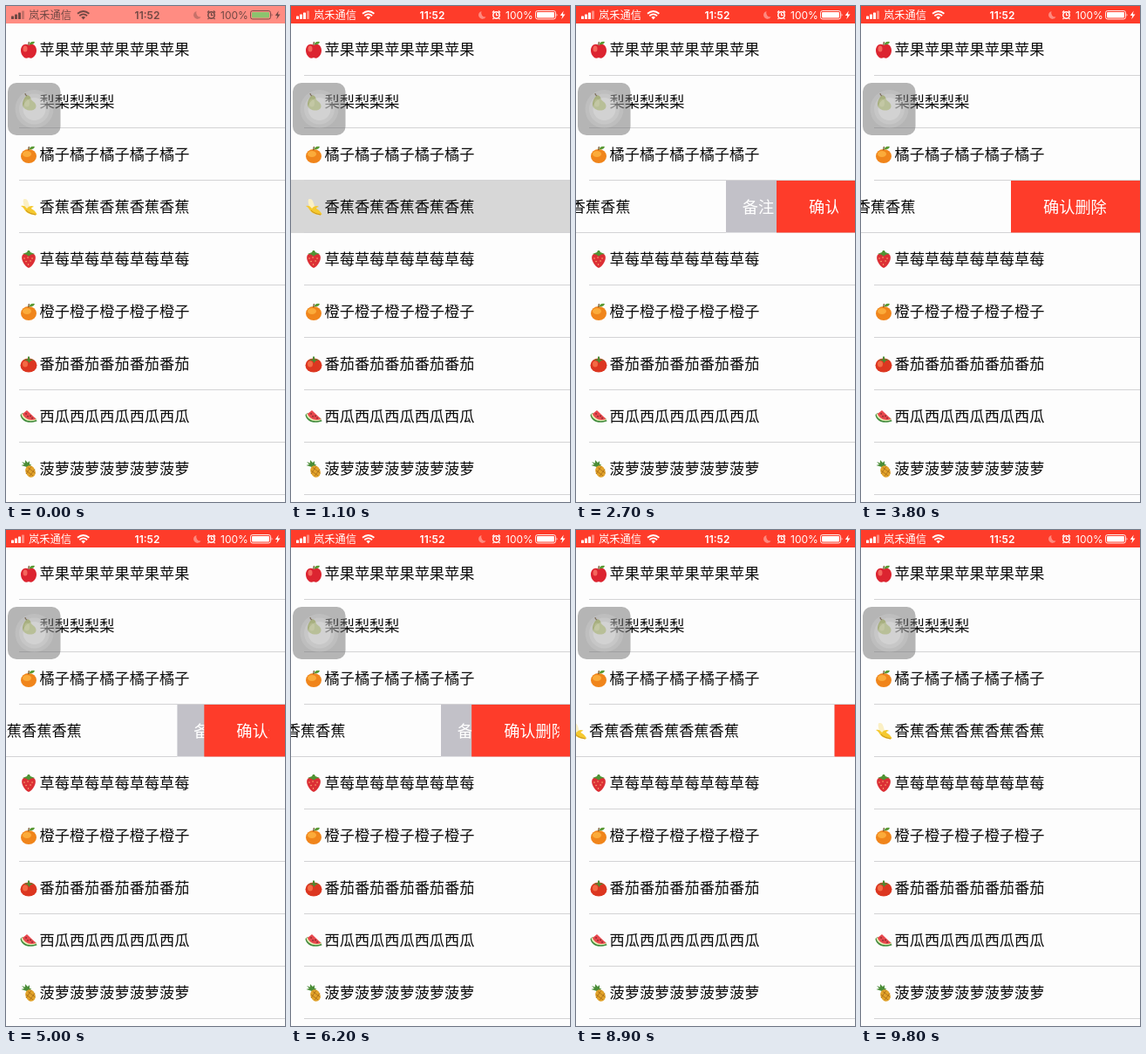
Write an HTML page that moves like this. It is 320 px wide and 568 px high and loops after 9900 ms.

```html
<!DOCTYPE html>
<html lang="zh-CN">
<head>
<meta charset="utf-8">
<title>水果列表</title>
<style>
  html, body { margin: 0; width: 100%; height: 100%; overflow: hidden; background: #fdfdfd; }
  svg { display: block; }
  #stage { width: 100vw; height: 100vh; }
  text { font-family: "Noto Sans CJK SC", "Noto Sans CJK", "Noto Sans CJK JP", sans-serif; }
  .name { font-size: 17.2px; fill: #0a0a0a; }
  .action { font-size: 18.2px; fill: #fff; }
  .latin { font-family: Inter, Roboto, sans-serif; font-size: 12px; }
  .line { fill: #d3d3d5; }
  #status { fill: currentColor; }
  .stroke { fill: none; stroke: currentColor; }
</style>
</head>
<body>
<svg id="stage" viewBox="0 0 320 568">
  <defs>
    <symbol id="leaf" viewBox="0 0 20 20">
      <path d="M10 5Q9.500 3 10.500 1" fill="none" stroke="#6b4a22" stroke-width="1.200"/>
      <path d="M10.500 4Q12 0 17 1 15.500 5 10.500 4z" fill="#5a9a35"/>
    </symbol>
    <symbol id="apple" viewBox="0 0 20 20">
      <path d="M10 5C6 2 1 5 1 11c0 5 4 8.800 6 8.800 1.500 0 2-.6 3-.6s1.500.6 3 .6c2 0 6-4 6-8.800 0-6-5-9-9-6z" fill="#dc2430"/>
      <ellipse cx="6" cy="9" rx="2.500" ry="3.500" fill="#f4665c"/>
      <use href="#leaf"/>
    </symbol>
    <symbol id="pear" viewBox="0 0 20 20">
      <path d="M7 3C9 1 12 3 12.500 6c.5 3 6 4 6 8.500 0 4-4 5.500-8 5-5-.6-8-4-7.500-8C3.500 8 5 5 7 3z" fill="#a9bd3c"/>
      <ellipse cx="8" cy="11" rx="3" ry="4.500" fill="#cad965"/>
      <path d="M8 3Q6 2 6 0" fill="none" stroke="#6b4a22" stroke-width="1.300"/>
    </symbol>
    <symbol id="orange" viewBox="0 0 20 20">
      <ellipse cx="10" cy="12" rx="9" ry="8" fill="#f0851b"/>
      <ellipse cx="8" cy="9.500" rx="5" ry="3.500" fill="#fbab3a"/>
      <use href="#leaf"/>
    </symbol>
    <symbol id="banana" viewBox="0 0 20 20">
      <path d="M4 1.500C7 0 9 2 10 6l2 7-5 1C5 10 3 5 4 1.500z" fill="#fbf0c4"/>
      <path d="M1 9c3-1 5 0 7 3 2-3 6-4 8-2-2 0-3 1-3 2 2 1 5 3 6.500 6.500l-1.500 1C14 19 9 18 6.500 15 5 13 4 10.500 1 9z" fill="#f5c92f"/>
      <path d="M7 14c3 3 6 4 11 5" fill="none" stroke="#c9921d"/>
    </symbol>
    <symbol id="strawberry" viewBox="0 0 20 20">
      <path d="M3 5C6 2 14 2 17 5c3 4-2 13-7 15C5 18 0 9 3 5z" fill="#dc2f35"/>
      <path d="M5 9h.1M9 8h.1M14 9h.1M7 12.500h.1M12 12h.1M9.500 16h.1" stroke="#ffc27a" stroke-width="1.300" stroke-linecap="round"/>
      <path d="M3 4l5-2 1-2h2l1 2 5 2-4 .5-3 2-3-2z" fill="#4f9434"/>
    </symbol>
    <symbol id="tomato" viewBox="0 0 20 20">
      <ellipse cx="10" cy="11.500" rx="9.500" ry="8" fill="#dc3620"/>
      <ellipse cx="6" cy="10" rx="3" ry="3.500" fill="#f36a43"/>
      <path d="M4 5l5-.5L9 1.500h2l.3 3L16 5l-4 1.500L10.500 9 9 6.500z" fill="#4c8a32"/>
    </symbol>
    <symbol id="melon" viewBox="0 0 20 20">
      <path d="M.5 8C1 15 9 19 19.500 15.500L18 12 3 6z" fill="#3f8a3b"/>
      <path d="M1.500 7.500C3 14 10 17 19 14l-1-2L4 6z" fill="#e6edb6"/>
      <path d="M3 7C5 12.500 11 15.500 18.500 13L8 3z" fill="#e8464c"/>
      <path d="M7 7h.1M9 10h.1M12 9.500h.1M14 12h.1" stroke="#42201d" stroke-width="1.300" stroke-linecap="round"/>
    </symbol>
    <symbol id="pineapple" viewBox="0 0 20 20">
      <path d="M8 8L1.500 6 5 5 2 2l4 1.500L6 0l3 3 2-2v4l2 0-2 3z" fill="#4a8d38"/>
      <ellipse cx="12" cy="13" rx="5.500" ry="7" transform="rotate(-25 12 13)" fill="#e2a32a"/>
      <path d="M7 12l8 6M9 8.500l8.500 6.500M7 16l6-9M11 18.500l6-8" stroke="#a86c19" stroke-width=".8"/>
    </symbol>
    <clipPath id="labelClip"><rect id="labelBox" y="200" width="320" height="60"/></clipPath>
  </defs>

  <rect width="320" height="568" fill="#fdfdfd"/>
  <rect id="press" y="199" width="320" height="61" fill="#d7d7d7"/>
  <g id="list"></g>

  <g id="actions">
    <g id="note">
      <rect y="200" width="160" height="59.500" fill="#c2c1c8"/>
      <text class="action" x="37" y="236.500" text-anchor="middle">备注</text>
    </g>
    <rect id="red" y="200" width="320" height="59.500" fill="#fe3c2a"/>
    <g clip-path="url(#labelClip)"><text id="label" class="action" y="236.500"></text></g>
  </g>

  <rect id="bar" width="320" height="20"/>
  <g id="status">
    <rect x="6" y="11.500" width="3" height="3.500" rx=".6"/>
    <rect x="10" y="9.500" width="3" height="5.500" rx=".6"/>
    <rect x="14" y="7.500" width="3" height="7.500" rx=".6"/>
    <rect x="18" y="5.500" width="3" height="9.500" rx=".6" opacity=".4"/>
    <text x="26" y="14.700" font-size="12.250">岚禾通信</text>
    <g class="stroke" stroke-width="1.800">
      <path d="M82 8.800q6.700-5.600 13.400 0M84.300 11.200q4.400-3.600 8.800 0"/>
    </g>
    <path d="M86.300 12.800q2.400-1.800 4.800 0l-2.400 2.600z"/>
    <text class="latin" x="162" y="14.500" text-anchor="middle" font-weight="600">11:52</text>
    <path d="M218.500 6a4.500 4.500 0 1 0 5 6.500 4.700 4.700 0 0 1-5-6.500z" opacity=".4"/>
    <g class="stroke">
      <circle cx="235.500" cy="10.500" r="3.700" stroke-width="1.500"/>
      <path d="M235.500 8v2.700h2M231 7.500l2-2M240 7.500l-2-2M232.500 14l-1 1.200M238.500 14l1 1.200" stroke-width="1.200"/>
      <rect x="280.500" y="5.500" width="23" height="9.500" rx="2.300" stroke-width=".9"/>
    </g>
    <text class="latin" x="246" y="14.500">100%</text>
    <rect id="charge" x="282" y="7" width="20" height="6.500" rx="1"/>
    <path d="M304.700 8.500q1.700 1.700 0 3.500z"/>
    <path d="M312.700 5.500l-4 5.400h2.600l-1 4.300 4.200-5.800h-2.700z"/>
  </g>

  <g id="assist">
    <rect x="2" y="88" width="60.500" height="60" rx="10" fill="#6e6e6e" fill-opacity=".5"/>
    <g fill="#fff">
      <circle cx="32.500" cy="118" r="22" opacity=".12"/>
      <circle cx="32.500" cy="118" r="17.500" opacity=".14"/>
      <circle cx="32.500" cy="118" r="13" opacity=".2"/>
    </g>
  </g>
</svg>
<script>
const LOOP = 9900, STEP = 100, OPEN = 148;
const fruits = [
  ['apple', '苹果'], ['pear', '梨'], ['orange', '橘子'], ['banana', '香蕉'], ['strawberry', '草莓'],
  ['orange', '橙子'], ['tomato', '番茄'], ['melon', '西瓜'], ['pineapple', '菠萝']
];
// [time, value] pairs, eased between neighbours
const swipe = [[1280, 0], [1900, OPEN], [4300, OPEN], [4750, 105], [5300, OPEN], [8152, OPEN], [9152, 0]];
const confirming = [[2520, 0], [3120, 1], [4700, 1], [5300, 0], [5890, 0], [6490, 1]];

const $ = id => document.getElementById(id);
const lerp = (a, b, u) => a + (b - a) * u;
const smooth = u => u * u * (3 - 2 * u);
const blend = (a, b, u) => `rgb(${a.map((v, i) => Math.round(lerp(v, b[i], u)))})`;

function track(keys, t) {
  const next = keys.findIndex(k => k[0] > t);
  if (next === 0) return keys[0][1];
  if (next < 0) return keys[keys.length - 1][1];
  const [t0, a] = keys[next - 1], [t1, b] = keys[next];
  return lerp(a, b, smooth((t - t0) / (t1 - t0)));
}

$('list').innerHTML = fruits.map(([icon, word], i) => {
  const y = 20 + i * 60;
  return `<g id="row${i}"><use href="#${icon}" x="16" y="${y + 20}" width="20" height="20"/>
    <text class="name" x="38.5" y="${y + 36}">${word.repeat(5)}</text>
    <rect class="line" x="15" y="${y + 59}" width="305" height="1"/></g>`;
}).join('');

function drawStatus(t) {
  const u = Math.min(t / 500, 1);
  $('bar').setAttribute('fill', blend([255, 140, 130], [254, 60, 42], u));
  $('status').style.color = blend([112, 72, 68], [255, 255, 255], u);
  $('charge').setAttribute('fill', blend([140, 195, 110], [255, 255, 255], u));
}

function drawRow(t) {
  const offset = track(swipe, t), p = track(confirming, t);
  const edge = 320 - offset, left = edge + (1 - p) * offset / 2;
  const sliding = p > 0 && p < 1;
  $('press').style.display = t >= 1100 && t < 1300 ? '' : 'none';
  $('row3').setAttribute('transform', `translate(${-offset})`);
  $('actions').style.display = offset > 0 ? '' : 'none';
  $('note').setAttribute('transform', `translate(${edge})`);
  $('red').setAttribute('x', left);
  $('label').textContent = p > 0 ? '确认删除' : '删除';
  $('label').setAttribute('x', left + (p > 0 ? 37 : 19));
  $('labelBox').setAttribute('width', sliding ? 296 + .3 * (246 - left) : 320);
}

function frame(now) {
  const t = Math.floor(now % LOOP / STEP) * STEP;
  drawStatus(t);
  drawRow(t);
  requestAnimationFrame(frame);
}
const start = performance.now();
frame(0);
function tick() { return performance.now() - start; }
frame = (draw => () => draw(tick()))(frame);
</script>
</body>
</html>
```
